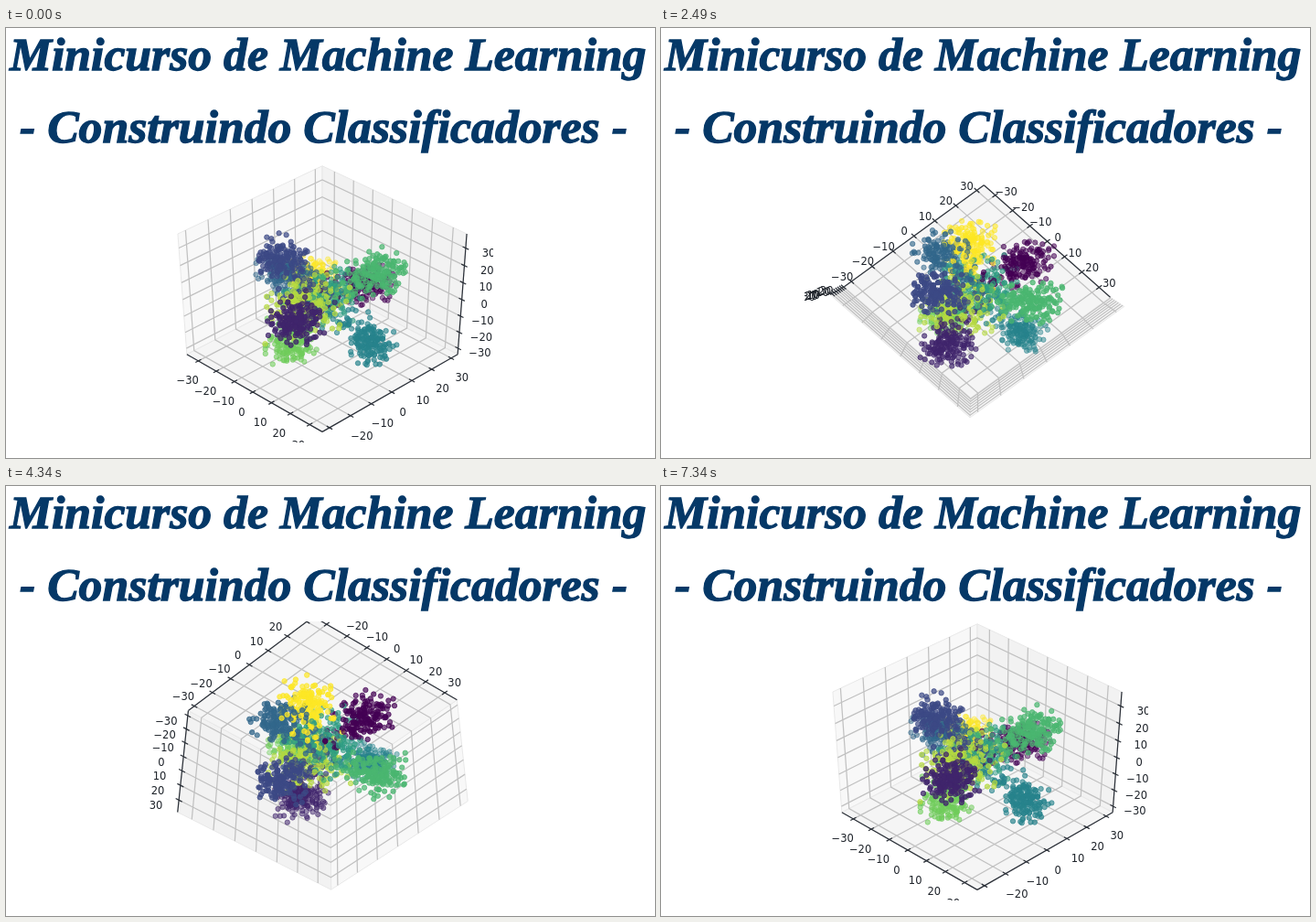
An HTML page with a canvas that plays this animation: 710x470 px, repeating every 7410 ms.

```html
<!DOCTYPE html>
<html lang="pt">
<head>
<meta charset="utf-8">
<style>
  html, body { margin: 0; width: 100%; height: 100%; overflow: hidden; background: #fff; }
  svg, canvas { position: absolute; left: 0; top: 0; width: 710px; height: 470px; }
  text {
    font: italic bold 51.7px "Liberation Serif", "Noto Serif", serif;
    fill: #053867; stroke: #053867; stroke-width: 1.3;
  }
</style>
</head>
<body>
<canvas id="plot" width="710" height="470"></canvas>
<svg viewBox="0 0 710 470">
  <text x="4" y="46">Minicurso de Machine Learning</text>
  <text x="15" y="125">- Construindo Classificadores -</text>
</svg>
<script>
const ctx = document.getElementById('plot').getContext('2d');
const LOOP = 7410, RESTART = 7340, STEP = LOOP / 96;
const CENTER = [346, 293], ZOOM = 2163, SQUEEZE = 0.8, DISTANCE = 10;
const LIMITS = [[-36.5, 36.5], [-33.4, 33.4], [-33.8, 38]];
const TICKS = Array.from({ length: 7 }, (_, i) => i * 10 - 30);
const RAD = Math.PI / 180;
const VIRIDIS = [[68, 1, 84], [59, 82, 139], [33, 145, 140], [94, 201, 98], [253, 231, 37]];

// Key views of the hand-turned box: time, elevation, turn off the diagonal
const POSES = [
  [0, 40.5, 0], [1390, 73.5, 6], [2490, 93.5, 2.8], [3730, 112.5, 0],
  [5120, 153, -8.5], [6310, 170, -17.3], [RESTART, 178, -24]
];

// Centre of each digit class: across, towards the viewer, up
const CLASSES = [
  [.25, -.23, -.09], [-.14, .33, .06], [-.22, -.03, .29], [-.21, -.27, -.03], [.26, .25, -.19],
  [0, -.07, -.04], [.29, .02, .21], [-.17, .16, -.28], [-.1, .06, 0], [-.06, -.34, -.11]
];

let seed = 20;
function random() {
  seed = (seed * 1664525 + 1013904223) % 4294967296;
  return (seed + 1) / 4294967297;
}
function gauss() {
  const g = Math.sqrt(-2 * Math.log(random())) * Math.cos(2 * Math.PI * random());
  return Math.max(-2.2, Math.min(2.2, g));
}
const mix = (a, b, f) => a + (b - a) * f;

function viridis(f) {
  const i = Math.min(3, Math.floor(f * 4));
  return `rgb(${VIRIDIS[i].map((v, n) => Math.round(mix(v, VIRIDIS[i + 1][n], f * 4 - i)))})`;
}

// Central classes are more diffuse; some points of each class drift to the middle.
const points = CLASSES.flatMap((mid, digit) => {
  const color = viridis(digit / 9);
  const spread = .098 - .11 * Math.hypot(...mid);
  return Array.from({ length: 180 }, () => {
    const drift = .8 * random() ** 5;
    const [u, w, z] = mid.map(m => m * (1 - drift) + spread * gauss());
    return { color, at: [(u + w) * Math.SQRT1_2, (u - w) * Math.SQRT1_2, z] };
  });
});

function poseAt(t) {
  const i = Math.max(1, POSES.findIndex(p => p[0] >= t));
  const [a, b] = [POSES[i - 1], POSES[i]];
  const f = (t - a[0]) / (b[0] - a[0]);
  return [mix(a[1], b[1], f), mix(a[2], b[2], f)];
}

function camera([elevation, turn]) {
  const e = elevation * RAD, a = (turn - 45) * RAD;
  const c = Math.cos(e), s = Math.sin(e), ca = Math.cos(a), sa = Math.sin(a);
  return ([x, y, z]) => {
    const ahead = x * ca + y * sa;
    const depth = DISTANCE - ahead * c - z * s;
    const k = ZOOM / depth;
    return [
      CENTER[0] + (y * ca - x * sa) * k,
      CENTER[1] - (z * c - ahead * s) * k * SQUEEZE,
      depth
    ];
  };
}

function unit(axis, value) {
  const [lo, hi] = LIMITS[axis];
  return (value - lo) / (hi - lo) - .5;
}

// Box position with one coordinate along the axis and two across it
function place(axis, along, a, b) {
  const p = [a, b];
  p.splice(axis, 0, along);
  return p;
}

function trace(list) {
  ctx.beginPath();
  list.forEach(p => ctx.lineTo(p[0], p[1]));
}

function line(color, list) {
  trace(list);
  ctx.strokeStyle = color;
  ctx.lineWidth = 1.25;
  ctx.stroke();
}

function drawPane(project, axis, side, color) {
  const corners = [[-.5, -.5], [.5, -.5], [.5, .5], [-.5, .5]];
  trace(corners.map(([a, b]) => project(place(axis, side, a, b))));
  ctx.closePath();
  ctx.fillStyle = color;
  ctx.fill();
  ctx.strokeStyle = '#e8e8e8';
  ctx.lineWidth = 1;
  ctx.stroke();
}

function drawGrid(project, walls) {
  for (let axis = 0; axis < 3; axis++) {
    const [a, b] = walls.filter((_, n) => n !== axis);
    for (const value of TICKS) {
      const at = (p, q) => project(place(axis, unit(axis, value), p, q));
      line('#c1c1c1', [at(-a, b), at(a, b), at(a, -b)]);
    }
  }
}

function drawAxis(project, axis, a, b, tickAxis) {
  const ink = '#2b3038';
  line(ink, [-.5, .5].map(v => project(place(axis, v, a, b))));
  for (const value of TICKS) {
    const p = place(axis, unit(axis, value), a, b);
    const shifted = d => p.map((v, n) => n === tickAxis ? v + Math.sign(v) * d : v);
    line(ink, [project(shifted(.02)), project(shifted(-.02))]);
    const [x, y] = project(p.map((v, n) => n === axis ? v : v + Math.sign(v) * .08));
    ctx.fillStyle = '#1e232a';
    ctx.fillText(String(value).replace('-', '−'), x, y + 6);
  }
}

function drawPoints(project) {
  const seen = points.map(p => ({ color: p.color, pos: project(p.at) }));
  seen.sort((a, b) => b.pos[2] - a.pos[2]);
  const far = seen[0].pos[2], near = seen[seen.length - 1].pos[2];
  ctx.lineWidth = 1;
  for (const { color, pos: [x, y, depth] } of seen) {
    ctx.globalAlpha = .36 + .5 * (far - depth) / (far - near);
    ctx.fillStyle = ctx.strokeStyle = color;
    ctx.beginPath();
    ctx.arc(x, y, 2.7, 0, 7);
    ctx.fill();
    ctx.stroke();
  }
  ctx.globalAlpha = 1;
}

function draw(t) {
  const pose = poseAt(t), project = camera(pose);
  const h = pose[0] > 90 ? -.5 : .5;
  ctx.clearRect(0, 0, 710, 470);
  ctx.save();
  ctx.beginPath();
  ctx.rect(157, 148, 376, 305);
  ctx.clip();
  ctx.font = '11.5px "DejaVu Sans", sans-serif';
  ctx.textAlign = 'center';
  ctx.textBaseline = 'middle';
  drawPane(project, 0, -h, '#f8f8f8');
  drawPane(project, 1, h, '#f2f2f2');
  drawPane(project, 2, -.5, '#f5f5f5');
  drawGrid(project, [-h, h, -.5]);
  drawAxis(project, 0, -h, -.5, 1);
  drawAxis(project, 1, h, -.5, 0);
  drawAxis(project, 2, h, h, 0);
  drawPoints(project);
  ctx.restore();
}

const start = performance.now();
let shown = -1;
function frame() {
  const t = (performance.now() - start) % LOOP;
  const step = t < RESTART ? Math.floor(t / STEP) * STEP : 0;
  if (step !== shown) draw(shown = step);
  requestAnimationFrame(frame);
}
frame();
</script>
</body>
</html>
```
